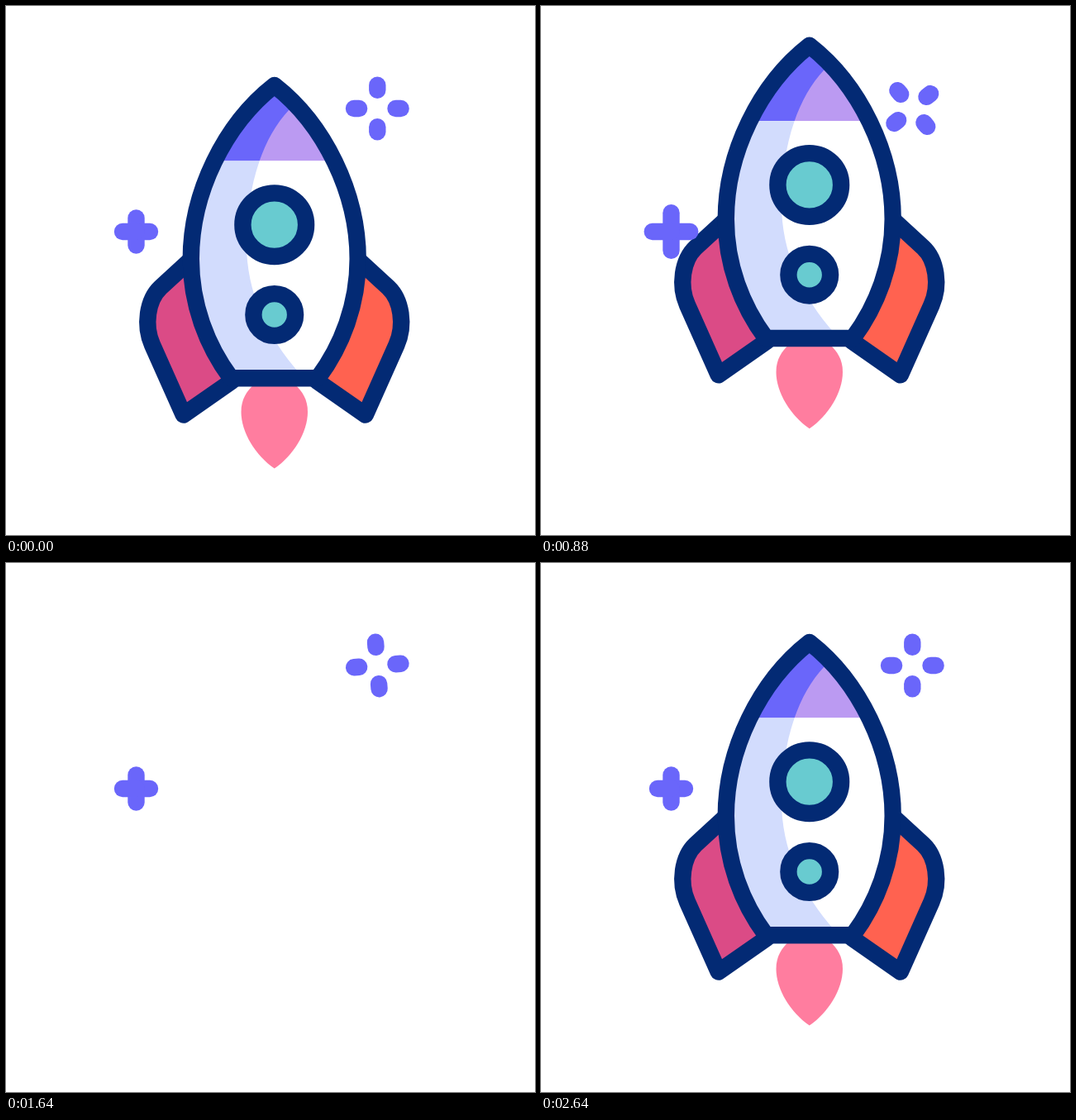
An HTML page with a canvas for the animation above (2.76 s loop, 640 px wide and 640 px high).

```html
<!DOCTYPE html>
<html lang="en">
<head>
<meta charset="utf-8">
<title>Rocket</title>
<style>
  html, body { margin: 0; width: 100%; height: 100%; overflow: hidden; background: #fff; }
  canvas { display: block; width: 640px; height: 640px; }
</style>
</head>
<body>
<canvas id="stage" width="640" height="640"></canvas>
<script>
const ctx = document.getElementById('stage').getContext('2d');
const LOOP = 2760, STEP = 40, LAST = 2640;
const AXIS = 324.75, LINE = 20.4;
const color = {
  navy: '#032a74', violet: '#6a66fa', lilac: '#bb9af2', shade: '#d2dcfd',
  teal: '#68cbd0', pink: '#ff7d9f', magenta: '#db4b86', orange: '#ff6250'
};

const body = new Path2D(`M324.75 96 C264.5 143 223.8 226 223.8 306 C223.8 361 243 411 272.3 450.3
  H377.2 C406.5 411 425.7 361 425.7 306 C425.7 226 385 143 324.75 96 Z`);
const shadow = new Path2D(`M343 125 C305 165 291 230 291 288 C291 345 315 400 356 445
  V470 H200 V80 H380 Z`);
const fin = new Path2D(`M224 306.5 L187 340.5 C171 355.5 166.5 386.5 177 410
  L214.7 494.6 L273 454 Z`);
const flame = new Path2D(`M324.75 559.5 C302 544 284.5 516 284.5 491 C284.5 476 291 466 300 458
  H349.5 C358.5 466 365 476 365 491 C365 516 347.5 544 324.75 559.5 Z`);

// Monotone cubic through [time, value] keys, at rest at both ends.
function track(keys, t) {
  const end = keys.length - 1;
  if (t <= keys[0][0]) return keys[0][1];
  if (t >= keys[end][0]) return keys[end][1];
  const span = i => keys[i + 1][0] - keys[i][0];
  const slope = i => (keys[i + 1][1] - keys[i][1]) / span(i);
  const tangent = i => {
    if (i === 0 || i === end) return 0;
    const a = slope(i - 1), b = slope(i);
    if (a * b <= 0) return 0;
    const m = (a * span(i) + b * span(i - 1)) / (span(i) + span(i - 1));
    return Math.sign(m) * Math.min(Math.abs(m), 3 * Math.abs(a), 3 * Math.abs(b));
  };
  let i = 0;
  while (t > keys[i + 1][0]) i++;
  const h = span(i), u = (t - keys[i][0]) / h, v = 1 - u;
  return keys[i][1] * v * v * (1 + 2 * u) + keys[i + 1][1] * u * u * (3 - 2 * u)
    + h * u * v * (tangent(i) * v - tangent(i + 1) * u);
}

const spin = [[0, 0], [560, 12.4], [880, 50.6], [1160, 117], [1640, 265.4], [2160, 348.2], [2640, 360]];
const pulse = [[500, 0], [850, 6.4], [1180, 0]];
const dip = [[0, 0], [600, 22.2]];

function rocketOffset(t) {
  if (t <= 600) return track(dip, t);
  if (t < 1640) return 22.2 - 255.8 * ((t - 600) / 560) ** 1.86;
  return 56.2 * (Math.max(0, 2482 - t) / 322) ** 2.5;
}

function paint(path, fill) {
  ctx.fillStyle = fill;
  ctx.fill(path);
}

function outline(path) {
  ctx.strokeStyle = color.navy;
  ctx.stroke(path);
}

function porthole(y, radius) {
  const ring = new Path2D();
  ring.arc(AXIS, y, radius, 0, 2 * Math.PI);
  paint(ring, color.teal);
  outline(ring);
}

function drawFin(fill, mirrored) {
  ctx.save();
  if (mirrored) {
    ctx.translate(2 * AXIS, 0);
    ctx.scale(-1, 1);
  }
  paint(fin, fill);
  outline(fin);
  ctx.restore();
}

function drawHull() {
  ctx.save();
  ctx.clip(body);
  const nose = (y, h, right, left) => {
    ctx.save();
    ctx.beginPath();
    ctx.rect(200, y, 250, h);
    ctx.clip();
    ctx.fillStyle = right;
    ctx.fillRect(200, y, 250, h);
    // The shaded side stops at the curve, left of the highlight.
    ctx.beginPath();
    paint(shadeSide, left);
    ctx.restore();
  };
  nose(80, 107.4, color.lilac, color.violet);
  nose(187.4, 283, '#fff', color.shade);
  ctx.restore();
  outline(body);
}

const shadeSide = new Path2D(`M356 80 L343 125 C305 165 291 230 291 288
  C291 345 315 400 356 445 V470 H200 V80 Z`);

function drawRocket(y) {
  ctx.save();
  ctx.translate(0, y);
  paint(flame, color.pink);
  drawFin(color.magenta, false);
  drawFin(color.orange, true);
  drawHull();
  porthole(264.7, 38.35);
  porthole(373.5, 25.35);
  ctx.restore();
}

// Four radial dashes between two distances from the centre.
function drawStar(x, y, inner, outer, degrees) {
  ctx.save();
  ctx.translate(x, y);
  ctx.rotate(degrees * Math.PI / 180);
  ctx.strokeStyle = color.violet;
  for (let i = 0; i < 4; i++) {
    ctx.beginPath();
    ctx.moveTo(0, -inner);
    ctx.lineTo(0, -outer);
    ctx.stroke();
    ctx.rotate(Math.PI / 2);
  }
  ctx.restore();
}

function draw(t) {
  ctx.fillStyle = '#fff';
  ctx.fillRect(0, 0, 640, 640);
  ctx.lineWidth = LINE;
  ctx.lineCap = ctx.lineJoin = 'round';
  drawRocket(rocketOffset(t));
  drawStar(157.5, 273, 0, 16.5 + track(pulse, t % 1320), 0);
  drawStar(449.3, 124, 22.2, 28.3, track(spin, t));
}

const start = performance.now();
function tick() {
  const t = (performance.now() - start) % LOOP;
  draw(Math.min(LAST, Math.floor(t / STEP) * STEP));
  requestAnimationFrame(tick);
}
tick();
</script>
</body>
</html>
```
